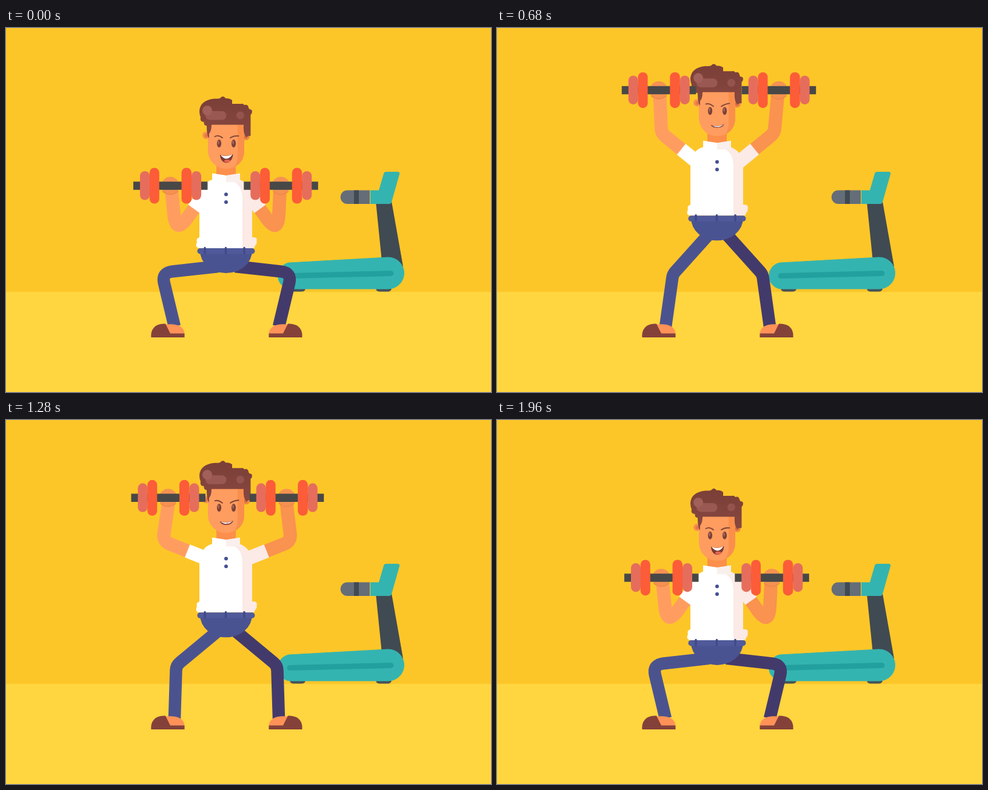
Animation, 800 px wide and 600 px high, one loop 2000 ms. Source, as an HTML page:

```html
<!DOCTYPE html>
<html lang="en">
<head>
<meta charset="utf-8">
<title>Squat press</title>
<style>
html, body { margin: 0; width: 100%; height: 100%; overflow: hidden; background: #fdc628; }
svg { display: block; width: 100vw; height: 100vh; }
</style>
</head>
<body>
<svg viewBox="0 0 800 600">
<defs>
  <g id="bell">
    <circle cx="61" r="14.8" fill="#f59252"/>
    <path d="M48 9Q61 20 74 9" fill="none" stroke="#ee8649" stroke-width="1.5"/>
    <path d="M0-6.7H122.5V6.7H0Z" fill="#484847"/>
    <g fill="#e66d5c">
      <rect x="11" y="-24" width="16" height="47.5" rx="8"/>
      <rect x="96" y="-24" width="16" height="47.5" rx="8"/>
    </g>
    <g fill="#fc5c38">
      <rect x="26.8" y="-29.5" width="16" height="59" rx="8"/>
      <rect x="79.5" y="-29.5" width="16.5" height="59" rx="8"/>
    </g>
  </g>
  <g id="shoe">
    <path d="M260 489Q293 485 294.500 504H262Z" fill="#ff9257"/>
    <path d="M239.500 510Q238 498 247 491Q254 487 263 487.500L271 503.500H294.500V510Z" fill="#84413a"/>
  </g>
  <linearGradient id="hairTone" x2="0" y2="1">
    <stop offset="0" stop-color="#7b3f37"/><stop offset="1" stop-color="#874840"/>
  </linearGradient>
</defs>

<path d="M0 0H800V600H0Z" fill="#fdc628"/>
<path d="M0 435H800V600H0Z" fill="#ffd540"/>

<!-- treadmill -->
<path d="M610 286H636L655 393L640 400L621 395Z" fill="#404a52"/>
<path d="M468 428H494Q494 434.500 488 434.500H474Q468 434.500 468 428ZM610 428H636Q636 434.500 630 434.500H616Q610 434.500 610 428Z" fill="#45525b"/>
<path d="M467 387L630 378A26 26 0 0 1 631 430H468A21.700 21.700 0 0 1 467 387Z" fill="#34b4b0" stroke="#34b4b0"/>
<path d="M468 408.500L635 404.500" stroke="#22a09f" stroke-width="9" stroke-linecap="round"/>
<path d="M600 267.500H563A11.200 11.200 0 0 0 563 290H600Z" fill="#646d78"/>
<path d="M574 267.500H582V290H574Z" fill="#404a52"/>
<path d="M601 267.500H615L623 240Q624 237 627 237H646Q650 237 649 241L636 287Q635 290 632 290H601Z" fill="#34b4b0"/>

<g fill="none" stroke-width="20.500">
  <path id="legR" stroke="#433a6c"/>
  <path id="legL" stroke="#4b538f"/>
</g>
<use href="#shoe"/>
<use href="#shoe" transform="matrix(-1 0 0 1 728 0)"/>

<g fill="none" stroke-width="22">
  <path id="armL" stroke="#ff9d61"/>
  <path id="armR" stroke="#fa9250"/>
  <path id="sleeveL" stroke="#fff" stroke-width="23"/>
  <path id="sleeveR" stroke="#fbeae6" stroke-width="23"/>
</g>

<g id="body">
  <!-- hips -->
  <path d="M320 367A43 37 0 0 0 406 367Z" fill="#4a5391"/>
  <!-- neck and shirt -->
  <path d="M347 222H379V246H347Z" fill="#fc8f4b"/>
  <path d="M340 250Q319 256 319 284V345Q313 347 315 353Q311 362 319 363H400V284Q400 254 385 250Z" fill="#fff"/>
  <path d="M363 250Q390 252 390 282V363H406V284Q406 257 385 250Z" fill="#fbeae6"/>
  <path d="M395 345H410Q415 346 413.500 352Q414 357 411 358Q411 363 406 363H395Q391 361 394 355Q391 349 395 345Z" fill="#fbeae6"/>
  <path d="M340 239.500L363 243V253H340Z" fill="#fff"/>
  <path d="M363 243L386 239.500V254H363Z" fill="#f9efec"/>
  <g fill="#454f92"><circle cx="363" cy="274.300" r="3"/><circle cx="363" cy="287" r="3"/></g>
  <!-- belt -->
  <rect x="315.500" y="363" width="95" height="9.500" rx="4.700" fill="#505a9b"/>
  <path d="M328 362.500V371M362.500 362.500V371M393 362.500V371" stroke="#404a89" stroke-width="3.500" stroke-linecap="round"/>
  <!-- head -->
  <circle cx="330" cy="177" r="6" fill="#f98f4e"/>
  <circle cx="330.500" cy="177.500" r="3" fill="#e27a43"/>
  <circle cx="396" cy="179" r="6" fill="#f08745"/>
  <circle cx="395.500" cy="179" r="3" fill="#d56f3d"/>
  <path d="M333 150H393V202A30 30 0 0 1 333 202Z" fill="#ff9c5f"/>
  <path d="M382 150H393V202Q393 221 377 229Q382 221 382 210Z" fill="#fa8f4d"/>
  <g fill="#7b4238">
    <ellipse cx="351.500" cy="190.300" rx="3.600" ry="6.500"/>
    <ellipse cx="375.500" cy="190.300" rx="3.600" ry="6.500"/>
  </g>
  <g fill="#a5645a">
    <ellipse cx="350.500" cy="188.500" rx="1.400" ry="3.200"/>
    <ellipse cx="374.500" cy="188.500" rx="1.400" ry="3.200"/>
  </g>
  <path id="brows" fill="none" stroke="#7b4238" stroke-width="1.800" stroke-linecap="round"/>
  <path id="mouth" fill="#7b3a33"/>
  <path id="teeth" fill="#fff"/>
  <ellipse id="tongue" cx="365" fill="#e5654f"/>
  <!-- hair -->
  <path d="M319 137Q320 119 344 116.500Q352 117 354 115A4.500 4.500 0 0 1 362 116Q369 115.500 373 119V125H388Q391 124 393 127Q399 125 400 131Q401 134 402 134Q406 134 406 138Q406 141 403.500 143V178Q399 177 397 180Q391 176 392 159.500H339Q339 170 335 174V182Q331 178 331 161Q326 161 326.500 155Q319 154 321 147Q319 143 319 137Z" fill="url(#hairTone)"/>
  <g fill="#a2605a">
    <circle cx="332" cy="136" r="8"/>
    <rect x="329" y="137" width="34.500" height="14.500" rx="7.200" opacity=".75"/>
    <circle cx="386.500" cy="144" r="6.500" opacity=".6"/>
  </g>
</g>

<use id="bellL" href="#bell"/>
<use id="bellR" href="#bell"/>
</svg>
<script>
const $ = id => document.getElementById(id);
const draw = (id, d) => $(id).setAttribute('d', d);
const toward = ([x, y], [u, v], r) => {
  const k = r / Math.hypot(u - x, v - y);
  return [x + (u - x) * k, y + (v - y) * k];
};

// cubic-bezier(.42, 0, .3, 1), clamped
function ease(x) {
  let lo = 0, hi = 1, s = .5;
  for (let i = 0; i < 24; i++) {
    s = (lo + hi) / 2;
    const q = 1 - s;
    if (1.26 * q * q * s + .9 * q * s * s + s * s * s < x) lo = s; else hi = s;
  }
  return s * s * (3 - 2 * s);
}

// Progress of a lift that starts at `start`, lasts `up`, and from 1000 ms sinks for `down`.
const lift = (t, start, up, down) =>
  t < 1000 ? ease((t - start) / up) : 1 - ease((t - 1000) / down);

// Two-bone limb: the more it folds, the further its joint moves out and the rounder it gets.
function limb(id, from, to, a, b, side, push) {
  const dx = to[0] - from[0], dy = to[1] - from[1];
  const d = Math.min(Math.hypot(dx, dy), a + b - .01);
  const fold = 1 - d / (a + b), round = 4 + 45 * fold;
  const angle = Math.atan2(dy, dx) + side * Math.acos((a * a + d * d - b * b) / (2 * a * d));
  let joint = [from[0] + a * Math.cos(angle), from[1] + a * Math.sin(angle)];
  const mid = [from[0] + dx / 2, from[1] + dy / 2];
  joint = toward(joint, mid, -push * fold);
  draw(id, `M${from}L${toward(joint, from, round)}Q${joint} ${toward(joint, to, round)}L${to}`);
  return joint;
}

function leg(s, hip, ankle, side) {
  limb('leg' + s, hip, ankle, 89.3, 86.7, side, 20);
}

function arm(s, shoulder, hand, side) {
  const elbow = limb('arm' + s, shoulder, hand, 72.5, 68.5, side, 16);
  draw('sleeve' + s, `M${toward(shoulder, elbow, -4)}L${toward(shoulder, elbow, 31)}`);
}

function face(p) {
  const y = 209 + 5 * p, depth = 13.3 - 9.5 * p, open = 1 - p, low = y + 1.33 * depth;
  const inner = 181 + 2 * p;
  draw('brows', `M344.500 179Q350 ${175.5 + 2 * p} 357 ${inner}M370 ${inner}Q376 ${177 + 2 * p} 383.500 178`);
  draw('mouth', `M353 ${y}C354 ${low} 373 ${low} 374.500 ${y - 1}Q364 ${y + 4} 353 ${y}Z`);
  draw('teeth', `M354 ${y + .4}Q364 ${y + 4} 373.500 ${y - .4}Q364 ${y + 4 + 9 * Math.sqrt(open)} 354 ${y + .4}Z`);
  const tongue = $('tongue');
  tongue.setAttribute('cy', y + depth - 3);
  tongue.setAttribute('rx', 5 * open);
  tongue.setAttribute('ry', 2.4 * open);
}

function frame() {
  const t = Math.floor(performance.now() % 2000 / 40) * 40;
  const body = lift(t, 45, 955, 1000), bar = lift(t, 77, 900, 980);
  const rise = 60 * body, barY = 260 - 175.5 * bar;
  const leftX = 210 - 4.7 * bar, rightX = 392.3 + 12.7 * bar;

  $('body').setAttribute('transform', `translate(0 ${-rise})`);
  $('bellL').setAttribute('transform', `translate(${leftX} ${barY})`);
  $('bellR').setAttribute('transform', `translate(${rightX} ${barY})`);

  const hipY = 393 - rise, shoulderY = 273 - rise;
  leg('L', [350, hipY], [278, 492], 1);
  leg('R', [378, hipY], [450, 492], -1);
  arm('L', [328, shoulderY], [leftX + 62.5, barY + 2], -1);
  arm('R', [401, shoulderY], [rightX + 60, barY + 2], 1);
  face(body);
  requestAnimationFrame(frame);
}
frame();
</script>
</body>
</html>
```
